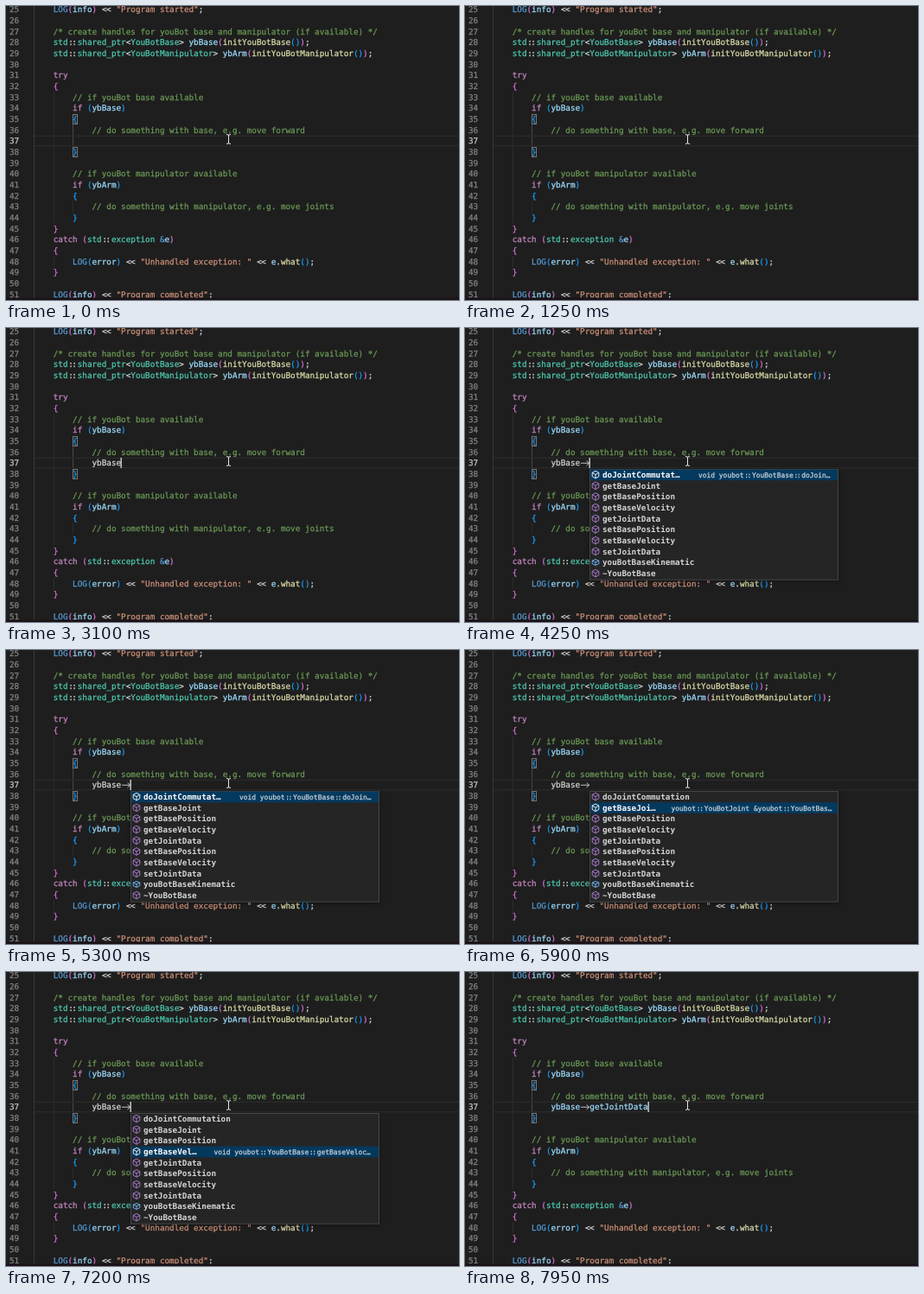
Write an HTML page with a canvas that moves like this. It is 524x340 px and loops after 8 s.

```html
<!DOCTYPE html>
<html lang="en">
<head>
<meta charset="utf-8">
<title>Code completion</title>
<style>
html, body { margin: 0; width: 100%; height: 100%; overflow: hidden; background: #1e1e1e; }
canvas { display: block; width: 524px; height: 340px; }
</style>
</head>
<body>
<canvas id="stage" width="524" height="340"></canvas>
<script>
const ctx = document.getElementById('stage').getContext('2d');
const W = 524, H = 340, LOOP = 8000;
const CELL = 5.6, ROW = 12.67, LEFT = 32.3, FIRST = 25, EDIT = 37;
const MONO = '"DejaVu Sans Mono", "Noto Sans Mono", monospace';
const CODE_FONT = '9.3px ' + MONO;
const BOLD_FONT = 'bold 9.3px ' + MONO;
const DETAIL_FONT = '7.93px ' + MONO;
const DETAIL_CELL = 4.77;
const C = {
  bg: '#1e1e1e', plain: '#d4d4d4', comment: '#6a9955', string: '#ce9178', keyword: '#c586c0',
  macro: '#569cd6', type: '#4ec9b0', func: '#dcdcaa', name: '#9cdcfe', match: '#2aaaff',
  purple: '#b180d7', orange: '#ee9d28', blue: '#75beff'
};
const BRACKETS = ['#ffd700', '#da70d6', '#179fff'];

const CODE = `    LOG(info) << "Program started";

    /* create handles for youBot base and manipulator (if available) */
    std::shared_ptr<YouBotBase> ybBase(initYouBotBase());
    std::shared_ptr<YouBotManipulator> ybArm(initYouBotManipulator());

    try
    {
        // if youBot base available
        if (ybBase)
        {
            // do something with base, e.g. move forward

        }

        // if youBot manipulator available
        if (ybArm)
        {
            // do something with manipulator, e.g. move joints
        }
    }
    catch (std::exception &e)
    {
        LOG(error) << "Unhandled exception: " << e.what();
    }

    LOG(info) << "Program completed";`.split('\n');

const POPUPS = {
  names: {
    rows: ['ybBase', 'YouBotBase', 'YouBotGripperBar', 'initYouBotBase', 'YouBotMailboxStatusFlags',
      'YOUBOT_YOUBOTBASE_H', 'YOUBOT_YOUBOTGRIPPER_H', 'YOUBOT_YOUBOTGRIPPERBAR_H',
      'YOUBOT_YOUBOTGRIPPERPARAMETER_H', 'YOUBOT_YOUBOTJOINT_H', 'YOUBOT_YOUBOTJOINTPARAMETER_H',
      'YOUBOT_YOUBOTJOINTPARAMETERPASSWORDPROTECTED…'],
    icon: i => ['variable', 'class', 'class', 'method', 'enum'][i] || 'constant',
    details: [['ybBase', 'std::shared_ptr<youbot::YouBotBase> yb…', 94]],
    scroll: true
  },
  members: {
    rows: ['doJointCommutation', 'getBaseJoint', 'getBasePosition', 'getBaseVelocity', 'getJointData',
      'setBasePosition', 'setBaseVelocity', 'setJointData', 'youBotBaseKinematic', '~YouBotBase'],
    icon: i => i === 8 ? 'field' : 'method',
    details: [
      ['doJointCommutat…', 'void youbot::YouBotBase::doJoin…', 126],
      ['getBaseJoi…', 'youbot::YouBotJoint &youbot::YouBotBas…', 94.5],
      ['getBasePos…', 'void youbot::YouBotBase::getBasePosit…', 96.5],
      ['getBaseVel…', 'void youbot::YouBotBase::getBaseVeloc…', 96.5],
      ['getJointDa…', 'void youbot::YouBotBase::getJointData…', 96.5]
    ]
  }
};

// Typed text by start time
const TYPING = [[300, ''], [1450, 'y'], [1650, 'yb'], [1800, 'ybB'], [2850, 'ybBase'],
  [3750, 'ybBase-'], [3950, 'ybBase->'], [7650, 'ybBase->getJointData']];
// Open list and selected row by start time
const LISTS = [[0], [1650, 'names', 0], [2850], [4050, 'members', 0], [5600, 'members', 1],
  [6400, 'members', 2], [6750, 'members', 3], [7300, 'members', 4], [7650]];

const colX = col => LEFT + col * CELL;
const rowY = line => 4 + (line - FIRST) * ROW;
const at = (keys, t) => keys.filter(k => k[0] <= t).pop() || keys[0];

function rect(x, y, w, h, color) {
  ctx.fillStyle = color;
  ctx.fillRect(x, y, w, h);
}

function path(points, color, width = 1) {
  ctx.beginPath();
  points.forEach(([x, y], i) => i ? ctx.lineTo(x, y) : ctx.moveTo(x, y));
  ctx.strokeStyle = color;
  ctx.lineWidth = width;
  ctx.stroke();
}

// Text on the editor grid; y is the middle of the row.
// A hairline outline gives the regular font a medium weight.
function write(text, x, y, color, font = CODE_FONT, cell = CELL) {
  const tighten = { ':': 0.14, '<': 0.06 };
  ctx.font = font;
  ctx.fillStyle = ctx.strokeStyle = color;
  ctx.lineWidth = 0.25;
  for (let i = 0; i < text.length; i++) {
    const c = text[i];
    if (c === ' ') continue;
    const side = text[i + 1] === c ? 1 : text[i - 1] === c ? -1 : 0;
    const cx = x + (i + side * (tighten[c] || 0)) * cell;
    ctx.fillText(c, cx, y + 3.3);
    if (font !== BOLD_FONT) ctx.strokeText(c, cx, y + 3.3);
  }
}

function wordColor(word) {
  if (/^(try|if|catch)$/.test(word)) return C.keyword;
  if (word === 'LOG' || word === '&') return C.macro;
  if (/^(std|shared_ptr|exception|YouBot\w+)$/.test(word)) return C.type;
  if (/^(what|init\w+)$/.test(word)) return C.func;
  return /^\w/.test(word) ? C.name : C.plain;
}

function drawCode() {
  let depth = 1;
  CODE.forEach((text, i) => {
    const line = FIRST + i, y = rowY(line);
    write(String(line), 4, y, line === EDIT ? '#c6c6c6' : '#858585');
    for (const m of text.matchAll(/\/[*\/].*|"[^"]*"|\w+|::|<<|[^\w\s]/g)) {
      const word = m[0];
      let color = wordColor(word);
      if (/^\/[*\/]/.test(word)) color = C.comment;
      else if (word[0] === '"') color = C.string;
      else if (/[({]/.test(word)) color = BRACKETS[depth++ % 3];
      else if (/[)}]/.test(word)) color = BRACKETS[--depth % 3];
      write(word, colX(m.index), y, color);
    }
  });
}

function guide(col, from, to, color) {
  const top = rowY(from) - ROW / 2;
  rect(Math.round(colX(col)), top, 1, (to - from + 1) * ROW, color);
}

function drawBack() {
  rect(0, 0, W, H, C.bg);
  guide(0, 25, 51, '#383838');
  guide(4, 33, 44, '#2c2c2c');
  guide(4, 48, 48, '#2c2c2c');
  guide(8, 36, 37, '#484848');
  guide(8, 43, 43, '#2c2c2c');
  const top = rowY(EDIT) - ROW / 2;
  rect(33, top, W - 33, 1.3, '#2a2a2a');
  rect(33, top + ROW - 1.3, W - 33, 1.3, '#2a2a2a');
  for (const line of [35, 38]) {
    ctx.strokeStyle = '#777';
    ctx.lineWidth = 1;
    ctx.strokeRect(77.5, Math.round(rowY(line) - 6) + 0.5, 5, 11);
  }
}

function drawTyped(text, caretOn) {
  const y = rowY(EDIT), x = colX(12);
  const [object, member] = text.split('->');
  write(object, x, y, member ? C.name : C.plain);
  if (member !== undefined) {
    const a = colX(18) + 0.9, b = colX(20) - 0.7;
    path([[a, y + 0.2], [b, y + 0.2]], C.plain, 0.9);
    path([[b - 3, y - 2.6], [b, y + 0.2], [b - 3, y + 3]], C.plain, 0.9);
    write(member, colX(20), y, C.name);
  }
  if (caretOn) rect(Math.round(x + text.length * CELL) - 0.5, y - 6, 1.3, 12, '#e0e0e0');
}

function drawIcon(kind, x, y, selected) {
  const tint = color => selected ? '#fff' : color;
  if (kind === 'method' || kind === 'field') {
    const color = tint(kind === 'field' ? C.blue : C.purple);
    const s = kind === 'field' ? 0.8 : 1;
    const p = (dx, dy) => [x + dx, y + dy * s];
    path([p(0, -4.2), p(3.8, -2.2), p(3.8, 2.2), p(0, 4.4), p(-3.8, 2.2), p(-3.8, -2.2), p(0, -4.2)], color, 0.9);
    path([p(-3.8, -2.2), p(0, 0), p(3.8, -2.2)], color, 0.9);
    path([p(0, 0), p(0, 4.4)], color, 0.9);
  } else if (kind === 'variable') {
    for (const s of [-1, 1]) path([[x + s * 2.5, y - 3], [x + s * 4, y - 3], [x + s * 4, y + 3], [x + s * 2.5, y + 3]], tint(C.blue));
    path([[x - 1.6, y], [x, y - 1.5], [x + 1.6, y], [x, y + 1.5], [x - 1.6, y]], tint(C.blue), 1.1);
  } else if (kind === 'class') {
    path([[x - 4, y - 1.5], [x - 1.5, y - 4], [x + 0.3, y - 2.2], [x - 2.2, y + 0.3], [x - 4, y - 1.5]], C.orange);
    path([[x - 1, y - 0.8], [x + 1.8, y - 0.8]], C.orange);
    path([[x + 0.3, y - 0.8], [x + 0.3, y + 2.8], [x + 1.8, y + 2.8]], C.orange);
    ctx.strokeRect(x + 2, y - 1.6, 2, 1.8);
    ctx.strokeRect(x + 2, y + 1.9, 2, 1.8);
  } else if (kind === 'enum') {
    ctx.strokeStyle = C.orange;
    ctx.lineWidth = 1;
    ctx.strokeRect(x - 0.7, y - 3.6, 4.7, 4.2);
    ctx.strokeRect(x - 4, y - 0.6, 4.5, 4);
    path([[x + 0.8, y - 1.7], [x + 2.8, y - 1.7]], C.orange);
    path([[x - 2.8, y + 1.4], [x - 0.8, y + 1.4]], C.orange);
  } else {
    ctx.strokeStyle = '#c5c5c5';
    ctx.lineWidth = 0.9;
    ctx.strokeRect(x - 4, y - 3.2, 8, 6.6);
    for (const dy of [-1, 1.2]) path([[x - 2.2, y + dy], [x + 2.2, y + dy]], '#c5c5c5', 0.9);
  }
}

// Letters of the query found in order are tinted
function writeMatched(text, query, x, y, color) {
  let k = 0;
  [...text].forEach((c, i) => {
    const hit = k < query.length && c.toLowerCase() === query[k].toLowerCase();
    if (hit) k++;
    write(c, x + i * CELL, y, hit ? C.match : color, BOLD_FONT);
  });
}

function drawPopup(name, selected, typed) {
  const list = POPUPS[name];
  const x = Math.round(colX(12 + typed.length)), top = 163, width = 288;
  const height = list.rows.length * ROW + 2;
  const query = name === 'names' ? typed : '';
  ctx.save();
  ctx.shadowColor = 'rgba(0,0,0,.36)';
  ctx.shadowBlur = 5;
  ctx.shadowOffsetY = 1;
  rect(x, top, width, height, '#454545');
  ctx.restore();
  rect(x + 1, top + 1, width - 2, height - 2, '#252526');
  list.rows.forEach((text, i) => {
    const y = top + 0.2 + (i + 0.5) * ROW, on = i === selected;
    if (on) rect(x + 1, y - ROW / 2 + 0.4, width - 2, ROW, '#04395e');
    drawIcon(list.icon(i), x + 7, y, on);
    const [label, detail, dx] = on ? list.details[i] : [text];
    writeMatched(label, query, x + 15, y, on ? '#fff' : C.plain);
    if (on) write(detail, x + dx, y, '#c8d3dc', DETAIL_FONT, DETAIL_CELL);
  });
  if (list.scroll) rect(x + width - 7.5, top + 1, 6.5, 93, 'rgba(121,121,121,.5)');
}

function drawPointer() {
  const x = 257.5, y = 154;
  path([[x, y - 5], [x, y + 5]], '#e8e8e8');
  for (const s of [-1, 1]) path([[x - 2.5, y + s * 5.5], [x, y + s * 4.8], [x + 2.5, y + s * 5.5]], '#e8e8e8');
}

function draw(t) {
  const [since, typed] = at(TYPING, t);
  const [, list, selected] = at(LISTS, t);
  const caretOn = ((t - since) % 1000 + 1000) % 1000 < 500;
  drawBack();
  drawCode();
  drawTyped(typed, caretOn);
  rect(0, 337.5, W, 2.5, '#1a1218');
  if (list) drawPopup(list, selected, typed);
  drawPointer();
}

ctx.textRendering = 'geometricPrecision';
const start = performance.now();
function tick() {
  draw((performance.now() - start) % LOOP);
  requestAnimationFrame(tick);
}
tick();
</script>
</body>
</html>
```
